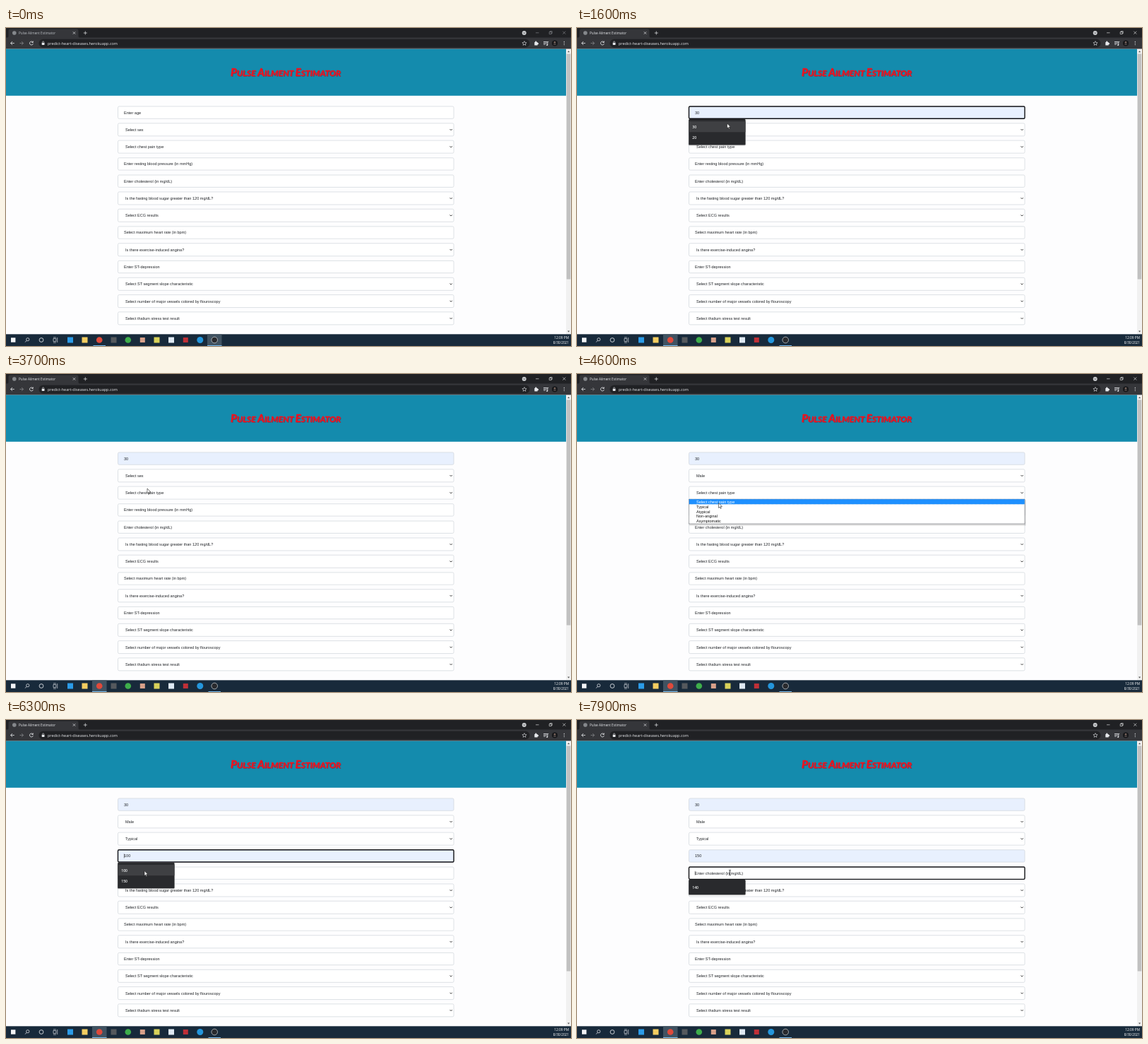
An HTML page that plays this animation: 800 by 450 pixels, repeating every 8 s.

```html
<!DOCTYPE html>
<html lang="en">
<head>
<meta charset="utf-8">
<title>Pulse Ailment Estimator</title>
<style>
html, body { margin: 0; width: 100%; height: 100%; overflow: hidden; background: #fff; }
svg { display: block; width: 100vw; height: 100vh; }
text { white-space: pre; }
.form { font: 5.556px "Liberation Sans", Arial, sans-serif; }
.ui { font-family: "Open Sans", "Noto Sans", sans-serif; }
.title { font: italic 700 12px Lato, sans-serif; text-anchor: middle; }
.big { font-size: 15px; }
</style>
</head>
<body>
<svg id="stage" viewBox="0 0 800 450" xmlns="http://www.w3.org/2000/svg">
  <g id="base"></g>
  <g id="live"></g>
</svg>
<script>
const LOOP = 8000, STEP = 100;
const TITLE = 'Pulse Ailment Estimator';
const LEFT = 158.5, WIDTH = 475.5;

// Leading * marks a select box
const LABELS = [
  'Enter age', '*Select sex', '*Select chest pain type',
  'Enter resting blood pressure (in mmHg)', 'Enter cholesterol (in mg/dL)',
  '*Is the fasting blood sugar greater than 120 mg/dL?', '*Select ECG results',
  'Select maximum heart rate (in bpm)', '*Is there exercise-induced angina?',
  'Enter ST-depression', '*Select ST segment slope characteristic',
  '*Select number of major vessels colored by flouroscopy', '*Select thalium stress test result'
];

const LISTS = [
  { row: 1, open: 2800, close: 3700, pick: 'Male', items: ['Select sex', 'Male', 'Female'] },
  { row: 2, open: 4400, close: 5300, pick: 'Typical',
    items: ['Select chest pain type', 'Typical', 'Atypical', 'Non-anginal', 'Asymptomatic'] }
];

const HINTS = [
  { row: 0, open: 1100, close: 2100, blur: 2800, pick: '30', items: ['30', '20'] },
  { row: 3, open: 5900, close: 7300, blur: 7900, pick: '150', items: ['100', '150'] },
  { row: 4, open: 7900, close: 8000, blur: 8000, pick: '', items: ['140'] }
];

// Pointer path: time, x, y
const PATH = [
  [100, 796, 262], [700, 319, 121], [900, 319, 122], [1100, 319, 122],
  [1600, 212.5, 135], [1900, 206, 138], [2100, 205, 139], [2600, 199.5, 139.5], [2800, 199.5, 139.5],
  [3500, 200, 161.5], [3700, 200, 162], [4300, 200, 167], [4600, 200.5, 182.5],
  [5000, 200, 188], [5300, 200, 188], [5700, 199, 193], [5900, 199, 193],
  [6300, 196, 213.5], [7000, 191, 229], [7100, 187, 228], [7300, 187, 228],
  [7800, 216.5, 216], [8000, 216.5, 216]
];

const rect = (x, y, w, h, fill, more = '') =>
  `<rect x="${x}" y="${y}" width="${w}" height="${h}" fill="${fill}" ${more}/>`;
const dot = (x, y, r, fill, more = '') => `<circle cx="${x}" cy="${y}" r="${r}" fill="${fill}" ${more}/>`;
const line = (d, color, w = 0.8, more = '') =>
  `<path d="${d}" fill="none" stroke="${color}" stroke-width="${w}" ${more}/>`;
const text = (x, y, s, fill, cls, more = '') =>
  `<text x="${x}" y="${y}" fill="${fill}" class="${cls}" ${more}>${s}</text>`;
const rowY = i => 119.6 + 24.27 * i;
const isSelect = i => LABELS[i][0] === '*';

function pointerAt(t) {
  const n = PATH.findIndex(p => p[0] > t);
  if (n <= 0) return null;
  const [a, b] = [PATH[n - 1], PATH[n]];
  const u = (t - a[0]) / (b[0] - a[0]), k = u * u * (3 - 2 * u);
  return { x: a[1] + (b[1] - a[1]) * k, y: a[2] + (b[2] - a[2]) * k };
}

function page() {
  let s = rect(0, 0, 800, 450, '#fdfdfe') + rect(0, 29.5, 793, 66.3, '#148bad');
  const words = TITLE.toUpperCase().split(' ')
    .map(w => `<tspan class="big">${w[0]}</tspan>${w.slice(1)}`).join(' ');
  s += text(397, 69, words, '#5d3f58', 'title', 'opacity=".75"');
  s += text(396, 68, words, '#f5101c', 'title', 'stroke="#f5101c" stroke-width=".3"');
  s += rect(793, 29.5, 7, 404, '#f1f1f1') + rect(793.7, 36.5, 5.6, 319, '#c1c1c1');
  s += '<path d="M795 34.2l1.6-2 1.6 2zM795 428.6l1.6 2 1.6-2z" fill="#505050"/>';
  return s;
}

function toolbar() {
  const c = '#e8eaed';
  let s = rect(0, 0, 800, 14, '#202124') + rect(0, 13.5, 800, 16, '#35363a');
  s += '<path d="M1 14q2.5 0 2.5-3V4q0-2.5 2.5-2.5h94q2.500 0 2.500 2.500v7q0 3 2.500 3z" fill="#35363a"/>';
  s += dot(11.8, 7, 2.8, '#85888c') + line('M94.800 5.300l3.400 3.400m0-3.400l-3.400 3.400M109.800 7h5m-2.500-2.500v5', c, 0.7);
  s += rect(46.5, 15.7, 695, 11.8, '#202124', 'rx="5.9"');
  s += line('M11.800 21.500H6.700m2.400-2.500l-2.500 2.500 2.500 2.500', c);
  s += line('M19.500 21.500h5m-2.400-2.500l2.500 2.500-2.500 2.500', '#85878a');
  s += line('M38 20a2.500 2.500 0 1 0 .4 2.200M38.300 18.500v2h-2', c);
  s += rect(50.7, 21, 3.8, 3, c, 'rx=".4"') + line('M51.500 21v-1a1.100 1.100 0 0 1 2.200 0v1', c, 0.6);
  s += text(59, 23.5, 'predict-heart-diseases.herokuapp.com', c, 'ui', 'font-size="5.5"');
  s += line('M734 18.600l.9 2 2.200.2-1.700 1.400.5 2.200-1.900-1.200-1.900 1.200.5-2.200-1.700-1.400 2.200-.2z', c, 0.6);
  s += rect(748.3, 20, 4.4, 4.4, c, 'rx=".5"') + dot(750.3, 19.6, 1.1, c) + dot(753, 22.2, 1.1, c);
  s += line('M761 19.500h5.500m-5.500 1.800h5.500m-5.500 1.800h3m2.800 1.200v-4.800h1.300', c, 0.8) + dot(766.1, 24, 1, c);
  s += dot(777, 21.5, 4, '#16171a') + dot(777, 20.2, 1.3, '#806a60') + rect(775.2, 21.8, 3.6, 2.2, '#4b4545', 'rx="1"');
  for (const y of [19.4, 21.5, 23.6]) s += dot(790.3, y, 0.6, c);
  return s + dot(733.7, 7, 3, '#c9cbce') + line('M732.500 6.500l1.200 1.200 1.200-1.200', '#202124', 0.7);
}

function windowState(active) {
  const c = active ? '#f1f3f4' : '#8f9195';
  return text(18, 8.8, TITLE, active ? '#e8eaed' : '#bdc1c6', 'ui', 'font-size="4.7"') +
    line('M750 6.800h4.500M769.200 5.600h3v3h-3zM770.200 5.600v-1h3v3h-1M788.300 4.700l4 4m0-4l-4 4', c, 0.6);
}

function taskbar(active) {
  const y = 441.5, c = '#f2f4f6';
  let s = rect(0, 433.3, 800, 16.7, '#182a3b');
  s += rect(active ? 122 : 285, 433.3, 20.5, 16.7, '#405261');
  s += rect(active ? 122 : 123.5, 449, active ? 20.5 : 17.5, 1, '#76b9ed');
  s += rect(active ? 286.500 : 285, 449, active ? 17.500 : 20.500, 1, '#76b9ed');
  s += rect(7, y - 3.2, 6.4, 6.4, c);
  s += dot(30.8, y - 0.8, 2.1, 'none', `stroke="${c}" stroke-width=".7"`) + line('M29.200 442.300l-2 2.200', c);
  s += dot(50, y, 2.9, 'none', `stroke="${c}" stroke-width=".8"`);
  s += line('M67 439.500h3.800v4H67zM67 437.900h3.800M67 445.200h3.800M72.700 438v7', c, 0.6);
  const box = (x, fill, w = 8) => rect(x - w / 2, y - w / 2, w, w, fill);
  s += box(91, '#2b9be8') + box(111.500, '#f3cd60') + dot(132.200, y, 4.300, '#df4a3b');
  s += box(152.500, '#55595d') + dot(172.800, y, 4.300, '#3eae4b') + box(193.300, '#d7a08a', 7);
  s += box(213.500, '#d8d25a') + box(234, '#dfe9f3') + box(254.300, '#bf3037', 7);
  s += dot(274.800, y, 4.500, '#2496dc') + dot(295.200, y, 4.300, '#292a2e', 'stroke="#d5d8db" stroke-width=".7"');
  s += text(797, 439.800, '12:09 PM', '#fff', 'ui', 'font-size="4.8" text-anchor="end"');
  return s + text(797, 447.200, '8/30/2021', '#fff', 'ui', 'font-size="4.7" text-anchor="end"');
}

function field(i, t, p) {
  const cy = rowY(i), sel = isSelect(i), h = sel ? 18 : 17.3;
  const hint = HINTS.find(m => m.row === i), list = LISTS.find(m => m.row === i);
  let label = LABELS[i].replace('*', ''), fill = '#fff', focus = false, x = sel ? 169 : 167;
  if (list && t > list.close) label = list.pick;
  if (hint) {
    focus = t >= hint.open && t < hint.blur;
    const value = t >= hint.close ? hint.pick : hint.items[hoverHint(hint, t, p)];
    if (value) { label = value; fill = '#e8f0fe'; }
  }
  let s = rect(LEFT, cy - h / 2, WIDTH, h, fill, focus
    ? 'rx="1.5" stroke="#101114" stroke-width="1.4"' : 'rx="1.8" stroke="#ced4da" stroke-width=".7"');
  s += text(x, cy + 2, label, '#202327', 'form');
  if (sel) s += line(`M628.500 ${cy - 0.8}l1.600 1.600 1.600-1.600`, '#222', 0.9);
  if (focus && (t - hint.open) % 1000 < 500) {
    const cx = x + (t >= hint.close ? hint.pick.length * 3.09 : 0) + 0.3;
    s += line(`M${cx} ${cy - 3}v6`, '#111', 0.5);
  }
  return s;
}

// Index of the suggestion under the pointer, or -1
function hoverHint(m, t, p) {
  if (!p || t < m.open || t >= m.close || p.x < 158 || p.x > 238.5) return -1;
  const k = Math.floor((p.y - rowY(m.row) - 12.5) / 15.2);
  return k < m.items.length ? Math.max(k, -1) : -1;
}

function hintBox(m, t, p) {
  if (t < m.open || t >= m.close) return '';
  const cy = rowY(m.row), h = m.items.length * 15.2 + 6, on = hoverHint(m, t, p);
  let s = rect(157.7, cy + 9.8, 81.3, h + 0.6, '#000', 'opacity=".2" rx="1.5"');
  s += rect(158.2, cy + 9.4, 80.3, h, '#292a2d', 'rx="1.2"');
  m.items.forEach((item, k) => {
    const y = cy + 12.5 + k * 15.2;
    if (k === on) s += rect(158.2, y, 80.3, 15.2, '#3f4043');
    s += text(163.3, y + 9.7, item, '#f1f3f4', 'ui', 'font-size="5.1" font-weight="600"');
  });
  return s;
}

function listBox(m, t, p) {
  if (t < m.open || t >= m.close) return '';
  const top = rowY(m.row) + 9.1, h = m.items.length * 6.95;
  const on = Math.max(0, Math.floor((p.y - top) / 6.95));
  let s = rect(LEFT + 0.5, top + 1, WIDTH + 1, h + 1.5, '#000', 'opacity=".14"');
  s += rect(LEFT, top, WIDTH, h, '#fff', 'stroke="#707479" stroke-width=".6"');
  m.items.forEach((item, k) => {
    const y = top + k * 6.95;
    if (k === on) s += rect(LEFT + 0.3, y, WIDTH - 0.6, 6.95, '#1e90ff', 'stroke="#1770c4" stroke-width=".4" stroke-dasharray=".6 .6"');
    s += text(169, y + 5.4, item, k === on ? '#fff' : '#111', 'form');
  });
  return s;
}

function pointer(t, p) {
  if (!p) return '';
  const overField = LABELS.some((_, i) => !isSelect(i) && p.x > 158 && p.x < 634 && Math.abs(p.y - rowY(i)) < 9);
  const covered = LISTS.some(m => t >= m.open && t <= m.close) ||
    HINTS.some(m => t >= m.open && t <= m.close && p.y > rowY(m.row) + 9.4);
  const shape = overField && !covered
    ? line('M-1.500-3.800q1.500 0 1.500 1v5.600q0 1-1.500 1M1.500-3.800q-1.500 0-1.500 1v5.600q0 1 1.500 1', '#15171a', 0.65)
    : '<path d="M0 0v7l1.600-1.500 1.100 2.500 1.100-.5-1.100-2.400h2.200z" fill="#fff" stroke="#111" stroke-width=".55"/>';
  return `<g transform="translate(${p.x} ${p.y})">${shape}</g>`;
}

function render(t) {
  const p = pointerAt(t), active = t >= 1100;
  live.innerHTML = windowState(active) + taskbar(active) +
    LABELS.map((_, i) => field(i, t, p)).join('') +
    LISTS.map(m => listBox(m, t, p)).join('') +
    HINTS.map(m => hintBox(m, t, p)).join('') + pointer(t, p);
}

const live = document.getElementById('live');
document.getElementById('base').innerHTML = page() + toolbar();
const start = performance.now();
let last = -1;
function tick() {
  const t = Math.floor((performance.now() - start) % LOOP / STEP) * STEP;
  if (t !== last) render(last = t);
  requestAnimationFrame(tick);
}
tick();
</script>
</body>
</html>
```
